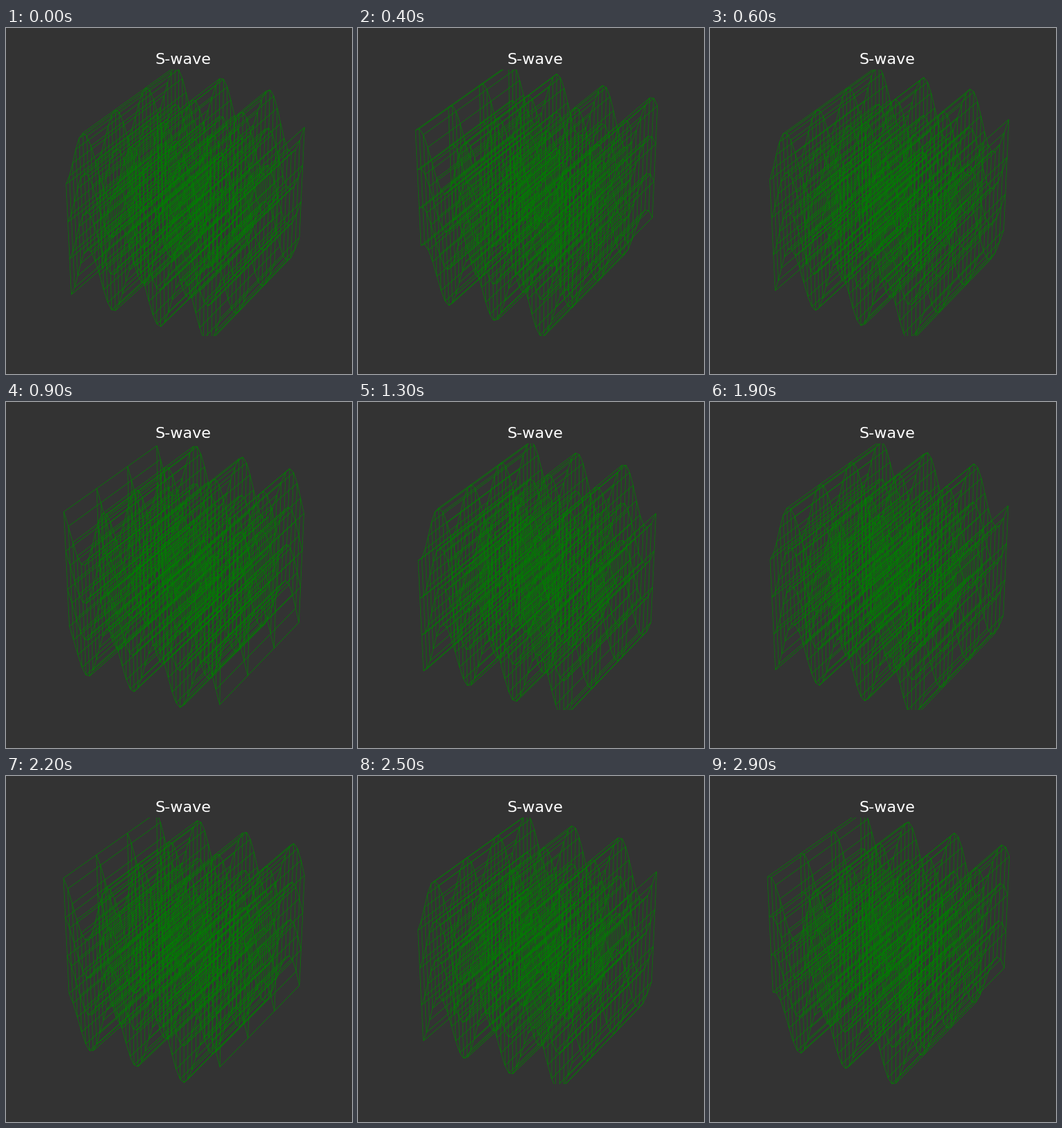
A matplotlib script that plays this animation: 500 by 500 pixels, repeating every 3 s.

```python
import numpy as np
import matplotlib.pyplot as plt
from matplotlib.animation import FuncAnimation
from mpl_toolkits.mplot3d.art3d import Line3DCollection

FRAMES = 30
HALF_LENGTH = 10
HALF_HEIGHT = 2

xs = np.linspace(-HALF_LENGTH, HALF_LENGTH, 40)
ys = np.linspace(-HALF_LENGTH, HALF_LENGTH, 4)
zs = np.linspace(-HALF_HEIGHT, HALF_HEIGHT, 4)
rest = np.stack(np.meshgrid(xs, ys, zs, indexing="ij"), axis=-1)


def displaced(t):
    """Lattice with a transverse wave running along x."""
    grid = rest.copy()
    grid[..., 2] += np.cos(rest[..., 0] - t + 1)
    return grid


def lines_along(grid, axis):
    """Polylines of the lattice that follow one axis."""
    run = np.moveaxis(grid, axis, 2)
    return run.reshape(-1, run.shape[2], 3)


fig = plt.figure(figsize=(5, 5), dpi=100, facecolor="#333333")
ax = fig.add_subplot(projection="3d", facecolor="#333333")
ax.set_axis_off()
ax.set_title("S-wave", color="white", fontsize=16)

meshes = []
for axis in range(3):
    mesh = Line3DCollection(
        lines_along(displaced(0), axis), colors="green", linewidths=0.5
    )
    ax.add_collection3d(mesh)
    meshes.append(mesh)

ax.set_xlim(-HALF_LENGTH, HALF_LENGTH)
ax.set_ylim(-HALF_LENGTH, HALF_LENGTH)
ax.set_zlim(-HALF_HEIGHT, HALF_HEIGHT)


def update(frame):
    grid = displaced(frame)
    for axis, mesh in enumerate(meshes):
        mesh.set_segments(lines_along(grid, axis))
    return meshes


anim = FuncAnimation(fig, update, frames=FRAMES, interval=100, repeat=True)
plt.show()
```
